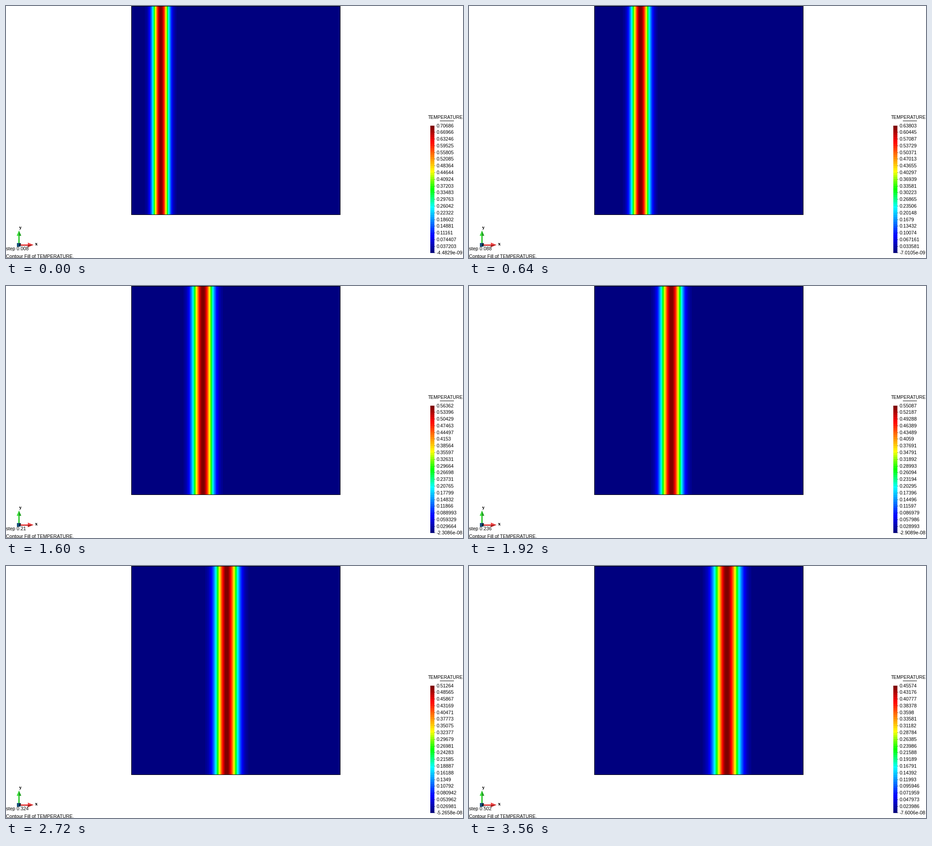
Recreate the animation shown at these times as a matplotlib script. Size 1007 by 556 pixels, loop 3.6 s.

```python
import numpy as np
import matplotlib.pyplot as plt
from matplotlib.animation import FuncAnimation
from matplotlib.colors import LinearSegmentedColormap
from matplotlib.patches import Polygon, Rectangle

W, H, DPI = 1007, 556, 64
PX = 72 / DPI                      # one pixel in points
FRAMES, INTERVAL = 90, 40

# Simulation time against frame, and the scale limits against time
KEY_FRAMES = [0, 16, 31, 48, 68, 79, 89]
TIMES = [0.008, 0.088, 0.182, 0.236, 0.324, 0.414, 0.502]
PEAKS = np.array([0.706863, 0.638033, 0.578405, 0.550865,
                  0.5126354, 0.481347, 0.455743])
LOWS = [-4.4829e-9, -7.0105e-9, -1.6621e-8, -2.9089e-8,
        -5.2658e-8, -7.4054e-8, -7.6006e-8]

LEFT, SIDE = 276, 461              # square domain with its outline
BAR_TOP, BAR_BOTTOM = 264, 545
LABELS = 20

cmap = LinearSegmentedColormap.from_list("heat", [
    (0, "#00007f"), (0.125, "#0000ff"), (0.355, "#00ffff"), (0.5, "#00ff00"),
    (0.645, "#ffff00"), (0.885, "#ff0000"), (1, "#7f0000")], N=57)

plt.rcParams["font.family"] = "Liberation Sans"
fig = plt.figure(figsize=(W / DPI, H / DPI), dpi=DPI, facecolor="white")
ax = fig.add_axes([0, 0, 1, 1])


def write(x, y, text, size=10.6, **style):
    return ax.text(x, y, text, fontsize=size * PX, va="baseline", **style)


def box(x, y, w, h, color="black", **style):
    ax.add_patch(Rectangle((x, y), w, h, fc=color, ec="none", **style))


def shape(points, color):
    ax.add_patch(Polygon(points, fc=color, ec="none", zorder=3))


def draw_axes_triad():
    green, dark_green = "#3fe03f", "#1f9a1f"
    red, dark_red = "#f04848", "#b02020"
    box(27, 506, 3, 19, green)
    box(29, 506, 1, 19, dark_green)
    shape([(23.5, 507), (28.5, 495.5), (33.5, 507)], green)
    shape([(28.5, 507), (28.5, 495.5), (33.5, 507)], dark_green)
    box(30, 526, 19, 3, red)
    box(30, 528, 19, 1, dark_red)
    shape([(48, 522), (60.5, 527), (48, 532)], red)
    shape([(48, 527), (60.5, 527), (48, 532)], dark_red)
    box(24, 523, 8, 8, "#14507c", zorder=4)
    for x, y, name in [(28, 492, "y"), (64.5, 528, "x"), (28, 529, "z")]:
        write(x, y, name, 9.5, family="DejaVu Serif", weight="bold", zorder=5)


# Field inside a one-pixel outline
box(LEFT, 0, SIDE, SIDE, zorder=0)
pixels = LEFT + np.arange(1, SIDE - 1) + 0.5
field = ax.imshow(np.zeros((1, SIDE - 2)), cmap=cmap, vmin=0, vmax=1,
                  aspect="auto", interpolation="nearest", zorder=1,
                  extent=(LEFT + 1, LEFT + SIDE - 1, SIDE - 1, 1))

# Colour scale
ax.imshow(np.linspace(1, 0, BAR_BOTTOM - BAR_TOP)[:, None], cmap=cmap,
          aspect="auto", interpolation="nearest",
          extent=(935, 944, BAR_BOTTOM, BAR_TOP))
write(930, 249, "TEMPERATURE", 10.3)
box(956, 253, 31, 1)
label_ys = np.linspace(263.5, 544.5, LABELS)
labels = [write(948.3, y + 4, "") for y in label_ys]
for y in label_ys[1:]:
    box(944, round(y), 2, 1, "#707070")

draw_axes_triad()
step_text = write(-0.5, 539, "", zorder=6)
write(-0.5, 556, "Contour Fill of TEMPERATURE.", 10.5)

ax.set_xlim(0, W)
ax.set_ylim(H, 0)
ax.axis("off")


def update(frame):
    t = round(np.interp(frame, KEY_FRAMES, TIMES) * 500) / 500
    # A spreading Gaussian: 1 / peak^2 grows linearly with time
    peak = np.interp(t, TIMES, PEAKS ** -2) ** -0.5
    low = np.interp(t, TIMES, LOWS)
    center = LEFT + 0.5 + 460 * (0.1325 + t)
    sigma = 8.63 / peak
    field.set_data(np.exp(-0.5 * ((pixels - center) / sigma) ** 2)[None, :])
    for label, value in zip(labels, np.linspace(peak, low, LABELS)):
        label.set_text(f"{value:.5g}")
    step_text.set_text(f"step {t:.5g}")
    return [field, step_text, *labels]


anim = FuncAnimation(fig, update, frames=FRAMES, interval=INTERVAL,
                     repeat=True, repeat_delay=0)
plt.show()
```
